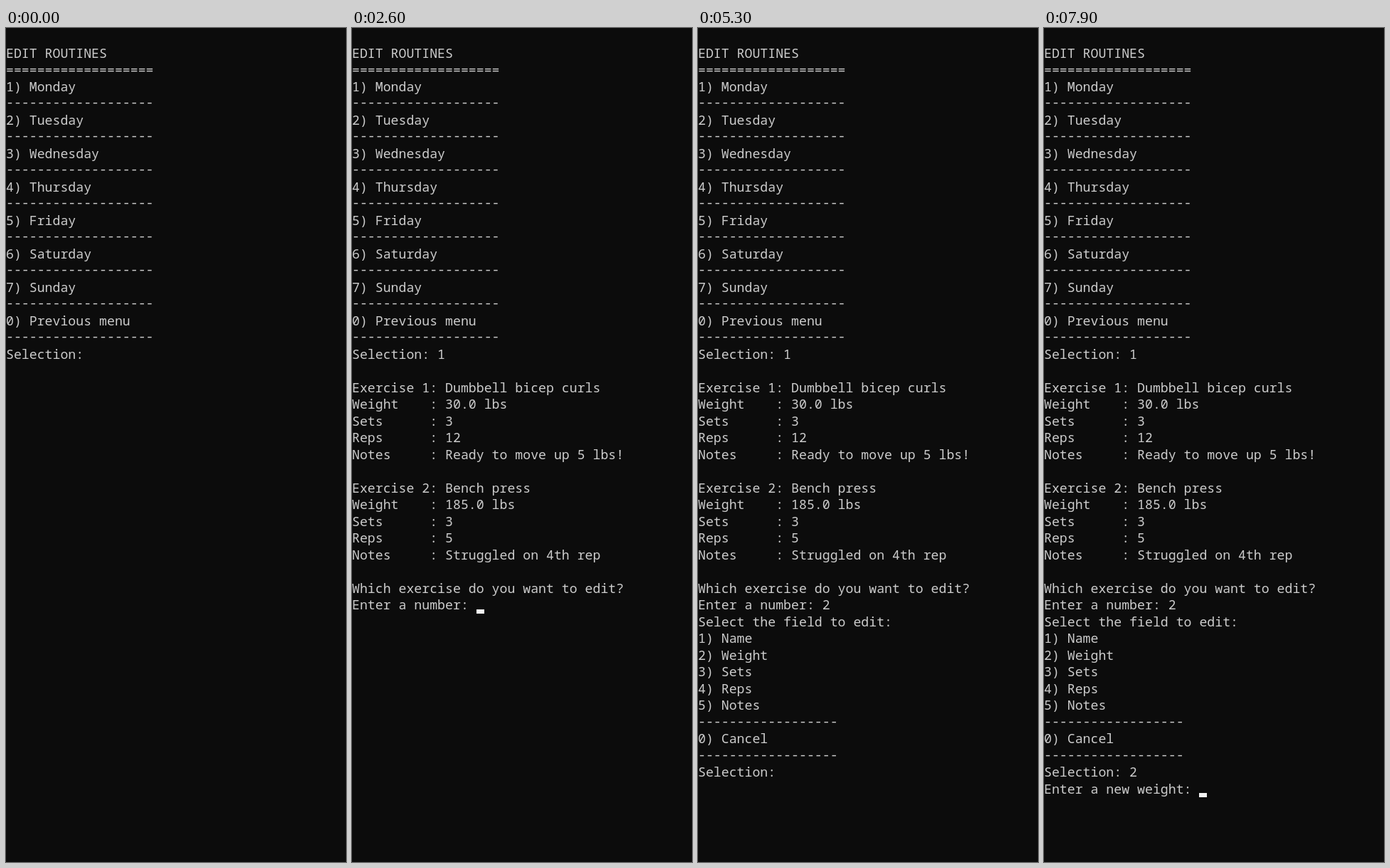
Animation of 478x1172 px, one loop 8000 ms. Source, as an HTML page with a canvas:

```html
<!DOCTYPE html>
<html lang="en">
<head>
<meta charset="utf-8">
<title>Edit routines</title>
<style>
  html, body { margin: 0; width: 100%; height: 100%; overflow: hidden; background: #0c0c0c; }
  canvas { display: block; }
</style>
</head>
<body>
<canvas id="screen" width="478" height="1172"></canvas>
<script>
const LOOP = 8000;
const CELL_W = 10.92, CELL_H = 23.5, BASELINE = 18.3;
const ctx = document.getElementById('screen').getContext('2d');

const rule = '-'.repeat(19), shortRule = '-'.repeat(18);
const days = ['Monday', 'Tuesday', 'Wednesday', 'Thursday', 'Friday', 'Saturday', 'Sunday'];
const fields = ['Name', 'Weight', 'Sets', 'Reps', 'Notes'];
const numbered = (names) => names.map((name, i) => `${i + 1}) ${name}`);

const exercise = (n, name, weight, sets, reps, notes) => [
  `Exercise ${n}: ${name}`,
  `Weight    : ${weight} lbs`,
  `Sets      : ${sets}`,
  `Reps      : ${reps}`,
  `Notes     : ${notes}`,
  ''
];

const dayMenu = [
  '', 'EDIT ROUTINES', '='.repeat(19),
  ...[...numbered(days), '0) Previous menu'].flatMap((item) => [item, rule]),
  'Selection: '
].join('\n');

const exerciseList = [
  '\n',
  ...exercise(1, 'Dumbbell bicep curls', '30.0', 3, 12, 'Ready to move up 5 lbs!'),
  ...exercise(2, 'Bench press', '185.0', 3, 5, 'Struggled on 4th rep'),
  'Which exercise do you want to edit?',
  'Enter a number: '
].join('\n');

const fieldMenu = [
  '', 'Select the field to edit:', ...numbered(fields),
  shortRule, '0) Cancel', shortRule, 'Selection: '
].join('\n');

// Console output and key presses, by time in ms
const output = [
  [0, dayMenu], [800, '1'], [1200, exerciseList],
  [3300, '2'], [3600, fieldMenu],
  [6100, '2'], [6500, '\nEnter a new weight: ']
];

// The cursor starts hidden; it toggles on blinks and shows after output
const cursorOn = [500, 1200, 2600, 3300, 4700, 5800, 6500, 7900];
const cursorOff = [0, 1000, 2100, 3100, 4200, 5300, 6300, 7400];
const latest = (times, t) => Math.max(-1, ...times.filter((at) => at <= t));

function drawLine(line, row) {
  [...line].forEach((ch, col) => {
    const lift = ch === '-' ? 1 : 0;
    ctx.fillText(ch, col * CELL_W, row * CELL_H + BASELINE - lift);
  });
}

function drawCursor(col, row) {
  const left = Math.round(col * CELL_W);
  const bottom = Math.round((row + 1) * CELL_H);
  ctx.fillStyle = '#f2f2f2';
  ctx.fillRect(left, bottom - 6, 11, 6);
}

function draw(t) {
  const lines = output.filter(([at]) => at <= t).map(([, text]) => text).join('').split('\n');
  ctx.fillStyle = '#0c0c0c';
  ctx.fillRect(0, 0, 478, 1172);
  ctx.fillStyle = '#cccccc';
  ctx.font = '18.2px "Noto Sans Mono", "DejaVu Sans Mono", monospace';
  lines.forEach(drawLine);
  if (latest(cursorOn, t) > latest(cursorOff, t)) {
    const row = lines.length - 1;
    drawCursor(lines[row].length, row);
  }
}

const start = performance.now();
function tick() {
  draw((performance.now() - start) % LOOP);
  requestAnimationFrame(tick);
}
tick();
</script>
</body>
</html>
```
